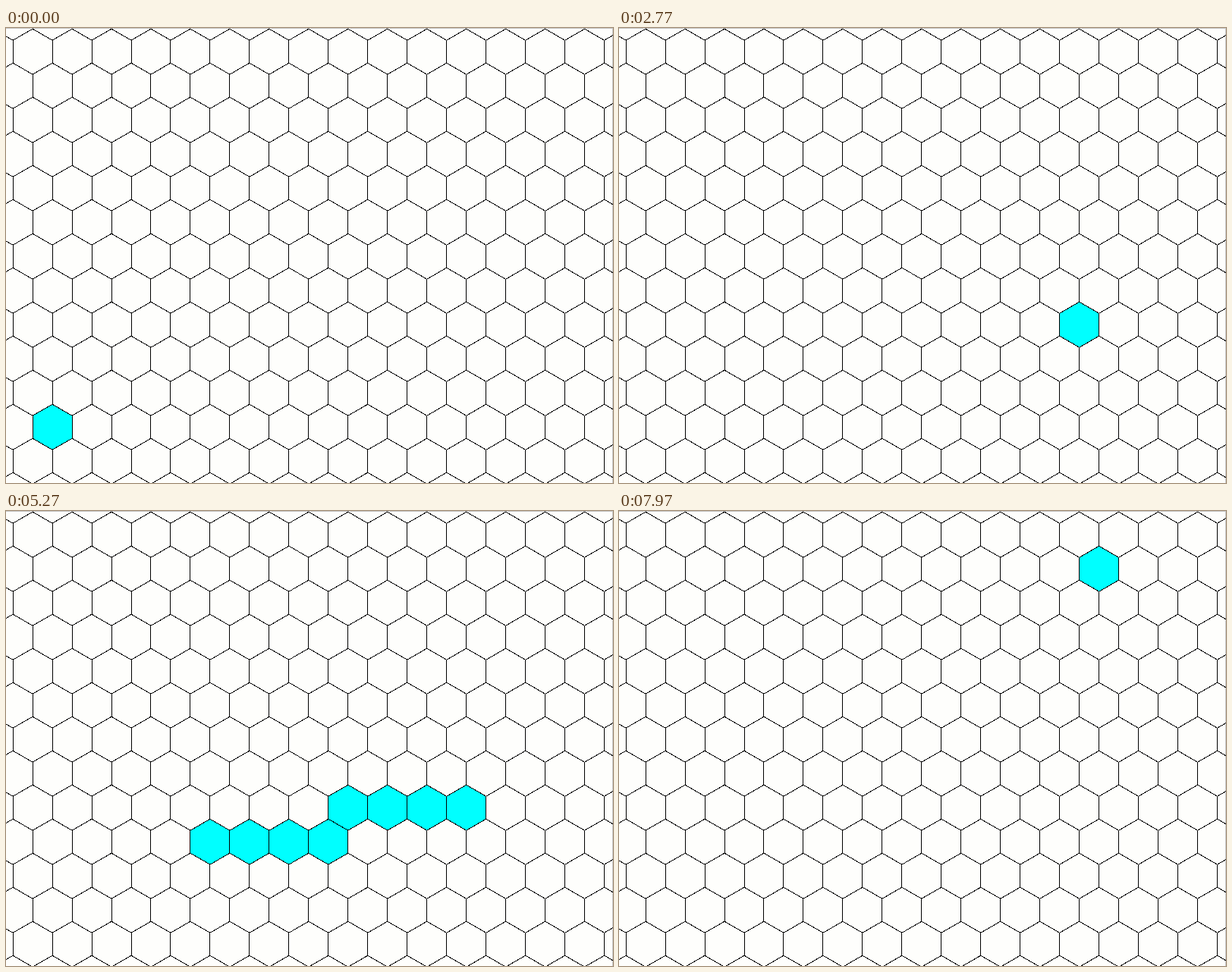
An HTML page that plays this animation: 800 by 600 pixels, repeating every 8000 ms.

```html
<!DOCTYPE html>
<html lang="en">
<head>
<meta charset="utf-8">
<title>Hex grid lines</title>
<style>
  html, body { margin: 0; width: 100%; height: 100%; overflow: hidden; background: #fefefc; }
  svg { display: block; width: 800px; height: 600px; shape-rendering: crispEdges; }
  #cells { fill: #00ffff; }
  #grid { fill: none; stroke: #000; stroke-width: 1; }
  #frame { fill: none; stroke: #c4c4c4; stroke-width: 1; }
</style>
</head>
<body>
<svg viewBox="0 0 800 600">
  <path id="frame" d="M0 .5H799.5V600"/>
  <path id="cells"/>
  <path id="grid"/>
</svg>
<script>
const LOOP = 8000, CLICK_DELAY = 100;
const RADIUS = 30, WIDTH = RADIUS * Math.sqrt(3), ROW = RADIUS * 1.5;
const LEFT = 35.1, TOP = 31.2;

// Each drag visits its [column, row] stops at an even pace, then a click ends it.
const drags = [
  { start: 150, end: 1400, stops: [[0, 11], [5, 11]] },
  { start: 1650, end: 2600, stops: [[5, 11], [11, 8]] },
  { start: 2850, end: 5830, stops: [[11, 8], [13, 2], [13, 8], [8, 12], [7, 10], [4, 9], [4, 5]] },
  { start: 6250, end: 7750, stops: [[4, 5], [6, 8], [8, 7], [8, 3], [11, 1]] }
];

const centre = (col, row) => ({
  row, x: LEFT + (col + (row & 1) / 2) * WIDTH, y: TOP + row * ROW
});

function cellAt(x, y) {
  const first = Math.floor((y - TOP) / ROW);
  const [a, b] = [first, first + 1].map(row =>
    centre(Math.round((x - LEFT) / WIDTH - (row & 1) / 2), row));
  const distance = c => Math.hypot(c.x - x, c.y - y);
  return distance(a) <= distance(b) ? a : b;
}

// A tiny nudge settles points that lie exactly between two cells.
const between = (a, b, k) =>
  cellAt(a.x + (b.x - a.x) * k + 0.01, a.y + (b.y - a.y) * k + 0.01);

function pointerAt({ start, end, stops }, time) {
  const progress = Math.min(1, Math.max(0, (time - start) / (end - start)));
  const spans = stops.length - 1;
  const i = Math.min(spans - 1, Math.floor(progress * spans));
  return between(centre(...stops[i]), centre(...stops[i + 1]), progress * spans - i);
}

function lineBetween(a, b) {
  const rows = Math.abs(a.row - b.row);
  const across = Math.abs(a.x - b.x) / WIDTH;
  const steps = Math.round(rows + Math.max(0, across - rows / 2));
  return Array.from({ length: steps + 1 }, (_, i) => between(a, b, steps ? i / steps : 0));
}

function litCells(time) {
  const drag = drags.find(d => time < d.end + CLICK_DELAY);
  if (!drag) return [centre(...drags.at(-1).stops.at(-1))];
  return lineBetween(centre(...drag.stops[0]), pointerAt(drag, time));
}

// Left side and both upper edges; repeated over all cells these make the whole grid.
function upperEdges({ x, y }) {
  const h = WIDTH / 2, q = RADIUS / 2;
  return `M${x - h} ${y + q}V${y - q}L${x} ${y - RADIUS}L${x + h} ${y - q}`;
}

const hexPath = cell => upperEdges(cell) +
  `V${cell.y + RADIUS / 2}L${cell.x} ${cell.y + RADIUS}Z`;

let gridPath = "";
for (let row = 0; row < 14; row++) {
  for (let col = -1; col < 17; col++) gridPath += upperEdges(centre(col, row));
}
document.getElementById("grid").setAttribute("d", gridPath);

const cells = document.getElementById("cells");
const start = performance.now();

function draw(now) {
  const time = Math.max(0, now - start) % LOOP;
  cells.setAttribute("d", litCells(time).map(hexPath).join(""));
  requestAnimationFrame(draw);
}
draw(start);
</script>
</body>
</html>
```
